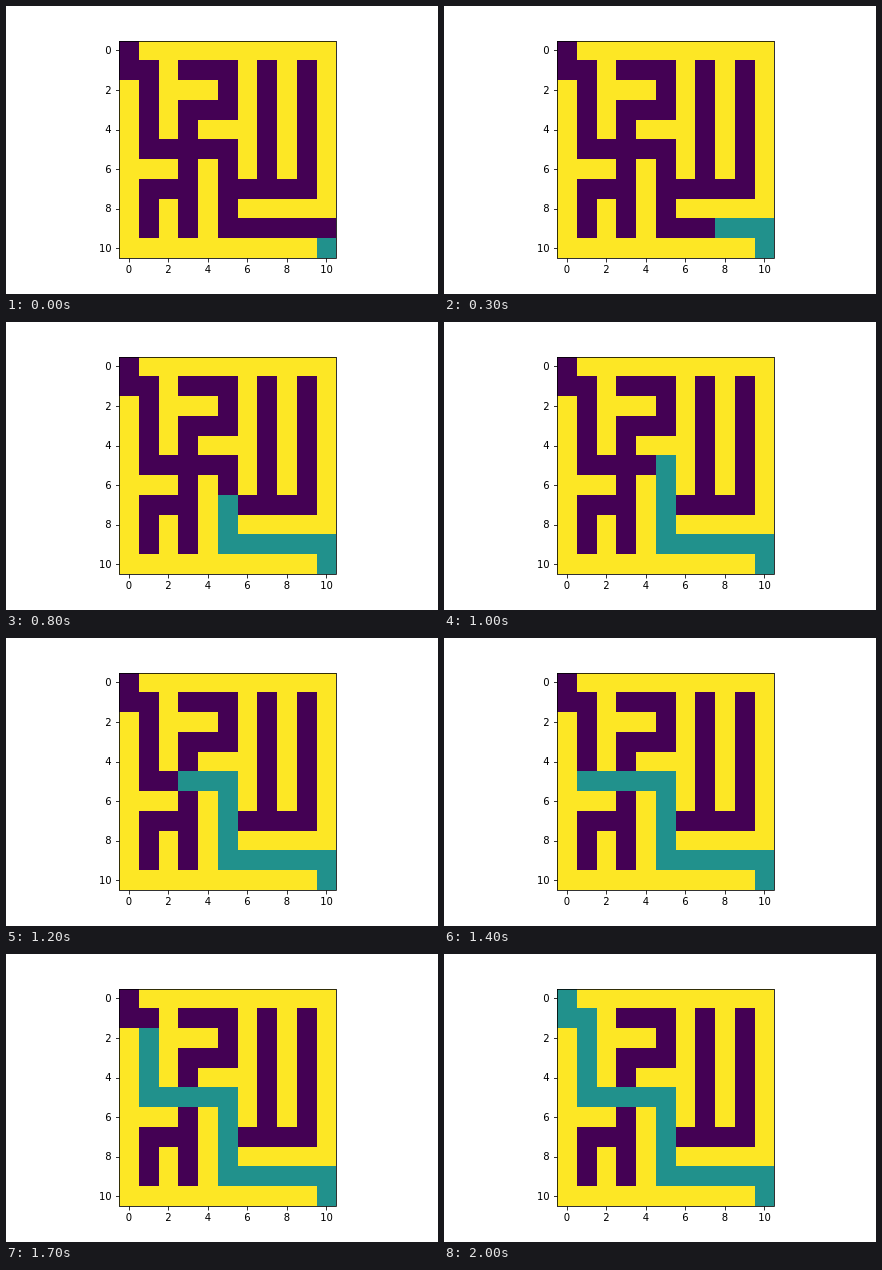
An HTML page with a canvas that plays this animation: 432 by 288 pixels, repeating every 2.1 s.

```html
<!DOCTYPE html>
<html lang="en">
<head>
<meta charset="utf-8">
<title>Maze path</title>
<style>
  html, body { margin: 0; width: 432px; height: 288px; overflow: hidden; background: #fff; }
  canvas { display: block; }
</style>
</head>
<body>
<canvas id="stage" width="432" height="288"></canvas>
<script>
const ctx = document.getElementById('stage').getContext('2d');
const WALL = '#fde725', OPEN = '#440154', PATH = '#21918c';
const CELL = 217.44 / 11, STEP = 100;

const maze = [
  '.##########',
  '..#...#.#.#',
  '#.###.#.#.#',
  '#.#...#.#.#',
  '#.#.###.#.#',
  '#.....#.#.#',
  '###.#.#.#.#',
  '#...#.....#',
  '#.#.#.#####',
  '#.#.#......',
  '##########.'
];

// Route from the bottom right corner to the top left one
const route = [[10, 10]];
for (const move of 'ULLLLLUUUULLLLUUUULU') {
  const [col, row] = route[route.length - 1];
  route.push(move === 'U' ? [col, row - 1] : [col - 1, row]);
}

const edgeX = i => Math.round(113 + i * CELL);
const edgeY = i => Math.round(34.56 + i * CELL);

function fillCell(col, row, color) {
  const x = edgeX(col), y = edgeY(row);
  ctx.fillStyle = color;
  ctx.fillRect(x, y, edgeX(col + 1) - x, edgeY(row + 1) - y);
}

function line(x1, y1, x2, y2) {
  ctx.beginPath();
  ctx.moveTo(x1, y1);
  ctx.lineTo(x2, y2);
  ctx.stroke();
}

function drawAxes() {
  ctx.strokeStyle = ctx.fillStyle = '#000';
  ctx.lineWidth = 0.8;
  ctx.strokeRect(113.5, 35.5, 217, 217);
  ctx.font = '10px "DejaVu Sans", sans-serif';
  for (let n = 0; n <= 10; n += 2) {
    const x = 112.68 + (n + 0.5) * CELL, y = 34.56 + (n + 0.5) * CELL;
    const tickX = Math.round(x) + 0.5, tickY = Math.round(y) + 0.5;
    line(tickX, 252.5, tickX, 256.5);
    line(110, tickY, 113.5, tickY);
    ctx.textAlign = 'center';
    ctx.fillText(n, x + 0.3, 267);
    ctx.textAlign = 'right';
    ctx.fillText(n, 105.7, Math.round(y + 3.65));
  }
}

function draw(time) {
  const count = Math.floor(time / STEP) % route.length + 1;
  ctx.fillStyle = '#fff';
  ctx.fillRect(0, 0, 432, 288);
  maze.forEach((cells, row) => [...cells].forEach((cell, col) =>
    fillCell(col, row, cell === '#' ? WALL : OPEN)));
  route.slice(0, count).forEach(([col, row]) => fillCell(col, row, PATH));
  drawAxes();
}

const start = performance.now();
function tick() {
  draw(performance.now() - start);
  requestAnimationFrame(tick);
}
tick();
</script>
</body>
</html>
```
